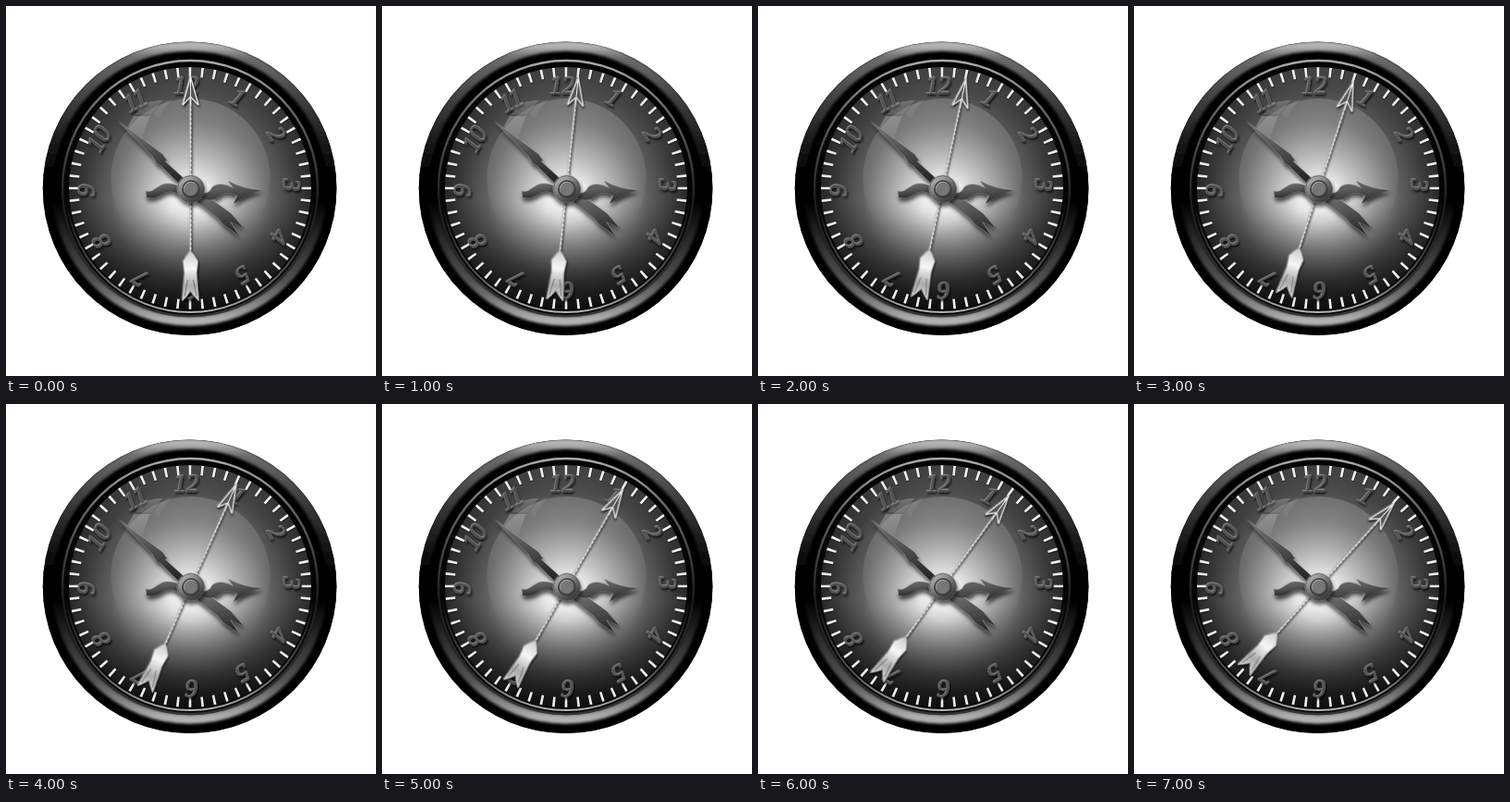
An HTML page that plays this animation: 400 px wide and 400 px high, repeating every 8000 ms.

```html
<!DOCTYPE html>
<html lang="en">
<head>
<meta charset="utf-8">
<title>Clock</title>
<style>
html, body { margin: 0; width: 100%; height: 100%; overflow: hidden; background: #fff; }
svg { display: block; width: 100vw; height: 100vh; }
#numerals text {
  font: italic 27px "Liberation Serif", "Noto Serif", serif;
  text-anchor: middle;
}
#second {
  transform-origin: 199.5px 198px;
  animation: tick 8s steps(8) infinite;
}
@keyframes tick { to { transform: rotate(48deg); } }
</style>
</head>
<body>
<svg viewBox="0 0 400 400">
  <defs>
    <clipPath id="case"><circle cx="198.6" cy="197.3" r="158.8"/></clipPath>
    <linearGradient id="topShine" x2="0" y2="1">
      <stop offset="0" stop-color="#b4b4b4"/>
      <stop offset=".04" stop-color="#6c6c6c"/>
      <stop offset=".2" stop-color="#3c3c3c"/>
      <stop offset=".45" stop-color="#000"/>
    </linearGradient>
    <linearGradient id="lowShine" x2="0" y2="1">
      <stop offset=".55" stop-color="#999" stop-opacity="0"/>
      <stop offset=".85" stop-color="#888" stop-opacity=".6"/>
      <stop offset="1" stop-color="#b4b4b4"/>
    </linearGradient>
    <linearGradient id="ring" x2="0" y2="1">
      <stop offset="0" stop-color="#aaa"/>
      <stop offset=".2" stop-color="#666"/>
      <stop offset=".55" stop-color="#1c1c1c"/>
      <stop offset="1" stop-color="#333"/>
    </linearGradient>
    <radialGradient id="dial" gradientUnits="userSpaceOnUse" cx="200" cy="211" r="140">
      <stop offset="0" stop-color="#fff"/>
      <stop offset=".16" stop-color="#eee"/>
      <stop offset=".38" stop-color="#aaa"/>
      <stop offset=".62" stop-color="#606060"/>
      <stop offset=".85" stop-color="#343434"/>
      <stop offset="1" stop-color="#202020"/>
    </radialGradient>
    <linearGradient id="shade" x2="0" y2="1">
      <stop offset="0" stop-color="#fff" stop-opacity=".16"/>
      <stop offset=".52" stop-color="#888" stop-opacity="0"/>
      <stop offset=".6" stop-color="#000" stop-opacity=".06"/>
      <stop offset="1" stop-color="#000" stop-opacity=".75"/>
    </linearGradient>
    <linearGradient id="glass" x2="0" y2="1">
      <stop offset="0" stop-color="#fff" stop-opacity=".18"/>
      <stop offset=".45" stop-color="#fff" stop-opacity=".1"/>
      <stop offset=".8" stop-color="#fff" stop-opacity="0"/>
    </linearGradient>
    <linearGradient id="pane" x1="0" y1="0" x2=".6" y2="1">
      <stop offset="0" stop-color="#fff" stop-opacity=".3"/>
      <stop offset="1" stop-color="#fff" stop-opacity=".04"/>
    </linearGradient>
    <linearGradient id="steel" x2=".3" y2="1">
      <stop offset="0" stop-color="#777"/>
      <stop offset=".5" stop-color="#555"/>
      <stop offset="1" stop-color="#2c2c2c"/>
    </linearGradient>
    <linearGradient id="hub" x2=".7" y2="1">
      <stop offset="0" stop-color="#ccc"/>
      <stop offset=".5" stop-color="#777"/>
      <stop offset="1" stop-color="#333"/>
    </linearGradient>
    <linearGradient id="silver" x2="0" y2="1">
      <stop offset="0" stop-color="#ccc"/>
      <stop offset=".35" stop-color="#f6f6f6"/>
      <stop offset=".7" stop-color="#aaa"/>
      <stop offset="1" stop-color="#ddd"/>
    </linearGradient>
    <filter id="soft"><feGaussianBlur stdDeviation="1.5"/></filter>
    <filter id="emboss" x="-20%" y="-20%" width="140%" height="140%">
      <feDropShadow dx="-.5" dy="-.9" stdDeviation=".3" flood-color="#aaa" flood-opacity=".75"/>
      <feDropShadow dx="1" dy="2" stdDeviation="1.2" flood-color="#000" flood-opacity=".8"/>
    </filter>
    <filter id="cast" x="-20%" y="-20%" width="140%" height="150%">
      <feDropShadow dx="-.4" dy="-.7" stdDeviation=".3" flood-color="#aaa" flood-opacity=".7"/>
      <feDropShadow dx="1" dy="4" stdDeviation="2.2" flood-color="#000" flood-opacity=".65"/>
    </filter>
  </defs>

  <g clip-path="url(#case)" fill="none">
    <rect width="400" height="400" fill="#000"/>
    <circle cx="198.6" cy="197.3" r="154" stroke="url(#topShine)" stroke-width="11" filter="url(#soft)"/>
    <circle cx="198.6" cy="197.3" r="143.5" stroke="url(#lowShine)" stroke-width="10" filter="url(#soft)"/>
  </g>
  <circle cx="199" cy="197" r="138" fill="#050505" stroke="url(#ring)" stroke-width="2.4"/>
  <circle cx="199" cy="197" r="134" fill="none" stroke="url(#lowShine)" stroke-width="2"/>
  <circle cx="199" cy="197" r="131" fill="url(#dial)"/>
  <circle cx="199" cy="197" r="131" fill="url(#shade)"/>
  <g fill="none" stroke-width="10.5">
    <circle cx="199.4" cy="198" r="125.6" stroke="#111" pathLength="600"
      stroke-dasharray="2.4 7.6" stroke-dashoffset="1.2" opacity=".6"/>
    <circle cx="199" cy="197" r="125.6" stroke="#eee" pathLength="600"
      stroke-dasharray="2 8" stroke-dashoffset="1"/>
  </g>

  <g id="numerals" fill="#505050" stroke="#505050" stroke-width=".4" filter="url(#emboss)"></g>

  <circle cx="199.5" cy="186" r="86" fill="url(#glass)"/>
  <g fill="url(#pane)">
    <path d="M147 107Q156 102 170 102Q162 109 158 117L140 117Z"/>
    <path d="M138 119L156 119Q150 131 147 146L130 133Z"/>
    <path d="M160 116Q165 107 174 102L180 101Q168 113 165 123Z" opacity=".5"/>
  </g>

  <g fill="url(#steel)" filter="url(#cast)">
    <path d="M122 125L169 160L174 167L172 168L193 187L188 193L167 172L163 170L158 162Z"/>
    <path d="M206 211L214 203L236 219L243 224L257 240L242 233L252 248L235 236L229 229Z"/>
    <path d="M151 200C160 203 164 192 175 192Q182 192 190 196L188 204Q178 198 171 202Q162 209 152 207Z"/>
    <path d="M212 202Q219 204 223 196Q231 189 246 197L240 189Q256 198 277 199Q258 204 246 214L250 205Q237 199 232 205Q224 212 212 208Z"/>
  </g>

  <g id="second" filter="url(#emboss)">
    <path d="M199.5 76V270" stroke="#eee" stroke-width="1.3"/>
    <path d="M200.2 108V266" stroke="#444" stroke-width=".7" stroke-dasharray="3 2"/>
    <path d="M199.5 77L208 107L199.5 98L191 107Z" fill="#555" stroke="#e5e5e5" stroke-width="1.2"/>
    <path d="M199.5 77V98" stroke="#eee"/>
    <path d="M199.5 265L203 269L207.5 276L206 289L208.5 319L203 313L199.5 308L196 313L190.5 319L193 289L191.5 276L196 269Z"
      fill="url(#silver)" stroke="#999" stroke-width=".6"/>
    <path d="M202.5 296L206 314M196.5 296L193 314" stroke="#666" stroke-width=".8"/>
  </g>

  <g filter="url(#cast)">
    <circle cx="200" cy="198" r="14.5" fill="url(#hub)" stroke="#555" stroke-width=".8"/>
  </g>
  <circle cx="200" cy="198" r="9" fill="url(#hub)" stroke="#3a3a3a" stroke-width="1.4"/>
  <circle cx="200" cy="198" r="7" fill="#777"/>
</svg>
<script>
// Each numeral stands upright along its own spoke.
const numerals = document.getElementById("numerals");
for (let hour = 1; hour <= 12; hour++) {
  const label = document.createElementNS("http://www.w3.org/2000/svg", "text");
  label.setAttribute("transform", `translate(198 197) rotate(${hour * 30}) translate(-3 -102)`);
  label.textContent = hour;
  numerals.append(label);
}
</script>
</body>
</html>
```
